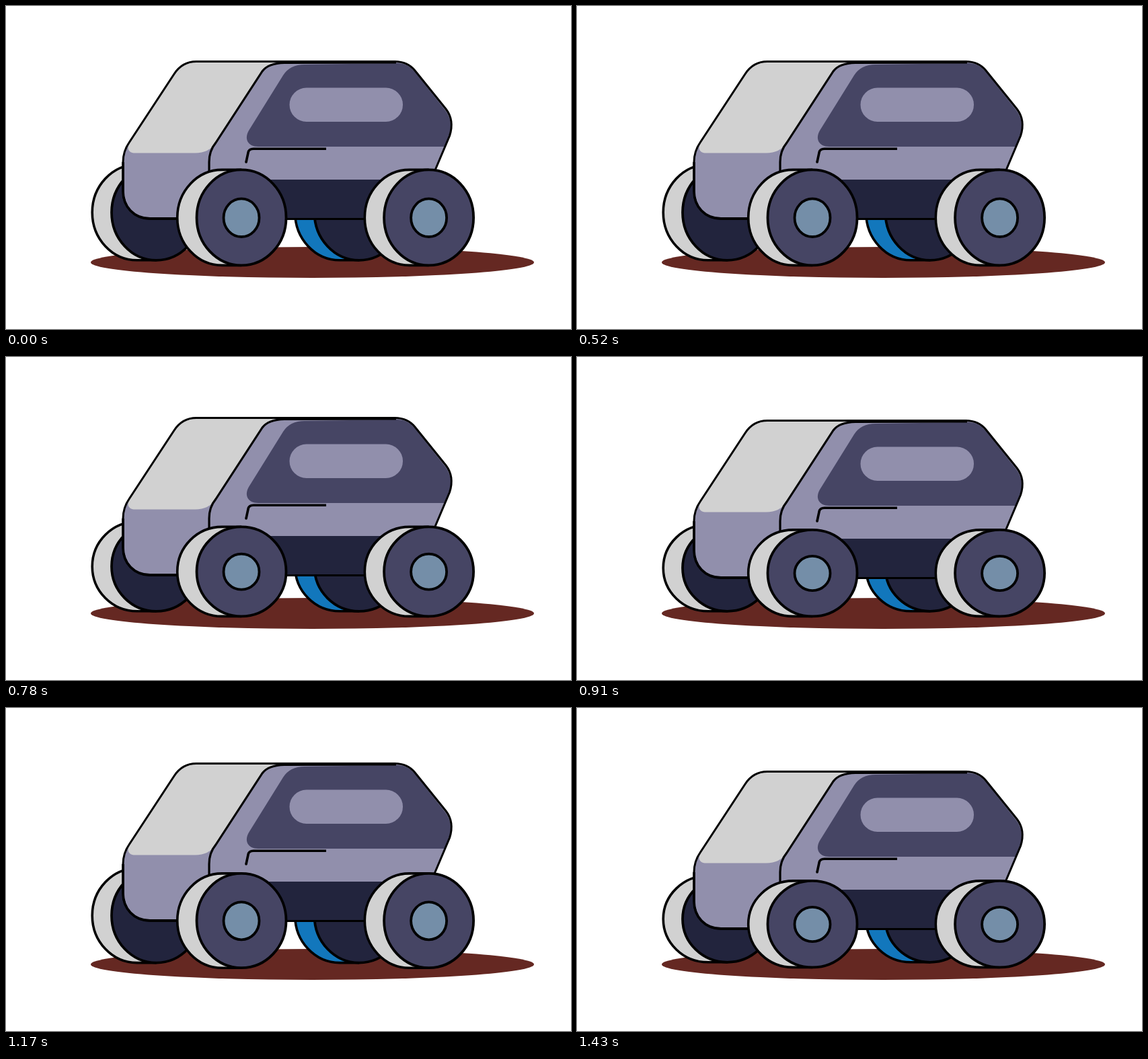
Recreate the animation shown at these times as an HTML page with a canvas. Size 840 px wide and 480 px high, loop 1560 ms.

```html
<!DOCTYPE html>
<html lang="en">
<head>
<meta charset="utf-8">
<title>Rover</title>
<style>
  html, body { margin: 0; width: 100%; height: 100%; overflow: hidden; background: #fff; }
  canvas { display: block; width: 840px; height: 480px; }
</style>
</head>
<body>
<canvas id="stage" width="840" height="480"></canvas>
<script>
const ctx = document.getElementById('stage').getContext('2d');

const STEP = 130, STEPS = 12;
const LILAC = '#918fac', SLATE = '#464564', NAVY = '#22243d', GREY = '#d1d1d1',
      BLUE = '#1277bc', HUB = '#748ea8', EARTH = '#652822';

// Each pose: body drop, wheel height, wheel shift
const POSES = {
  tall:  { drop: 0,  height: 142,   shift: 0 },
  shake: { drop: 0,  height: 140.3, shift: 0.8 },
  dip:   { drop: 8,  height: 133,   shift: 0 },
  low:   { drop: 12, height: 128.5, shift: 0 }
};

function poseAt(ms) {
  const i = Math.floor(ms / STEP) % STEPS;
  const sinking = i >= 6 && i % 4 >= 2;
  if (sinking) return i % 2 ? POSES.low : POSES.dip;
  return i % 2 ? POSES.shake : POSES.tall;
}

function paint(path, fill, width) {
  if (fill) {
    ctx.fillStyle = fill;
    ctx.fill(path);
  }
  if (width) {
    ctx.lineWidth = width;
    ctx.stroke(path);
  }
}

function oval(x, y, rx, ry) {
  const p = new Path2D();
  p.ellipse(x, y, rx, ry, 0, 0, Math.PI * 2);
  return p;
}

function wheel(x, bottom, pose, tread, face, hub) {
  const rx = 66.5, ry = pose.height / 2, y = bottom + pose.shift - ry, back = x - 28.8;
  const tyre = new Path2D();
  tyre.moveTo(x, y - ry);
  tyre.lineTo(back, y - ry);
  tyre.ellipse(back, y, rx, ry, 0, -Math.PI / 2, Math.PI / 2, true);
  tyre.lineTo(x, y + ry);
  paint(tyre, tread, 3.6);
  paint(oval(x, y, rx, ry), face, 3.8);
  if (hub) paint(oval(x, y + 0.3, 26.5, 26.5 * ry / rx), hub, 3.8);
}

const shell = new Path2D(`M283 82.5 H578 Q597 82.5 608 96 L654 153 Q667 170 659.5 193
  L632 258 L605 316.5 H214 C190 316 174 298 174 275 V232 Q174 216 183 203
  L250 101 Q262 82.5 283 82.5 Z`);
const windscreen = new Path2D(`M283 82.5 H412 Q390 84 381 97 L312 203
  Q302 218.5 281 218.5 H190 Q178 217 183 203 L250 101 Q262 82.5 283 82.5 Z`);
const skirt = new Path2D('M330 258 H632 L605 316.5 H330 Z');
const panel = new Path2D(`M444 87 L580 85 Q597 84 608 98 L653 155 Q665 171 659 193
  L652 209 H375 C359 209 354 197 361 185 L412 103 Q422 87 444 87 Z`);
const pillar = new Path2D('M580 84 L414 84.5 Q390 85 381 97 L312 203 Q302 215 302 232 V250');
const pill = new Path2D();
pill.roundRect(421.5, 121.5, 168.5, 50.5, 25.2);
const handle = new Path2D('M476 212.3 H368 Q361 212.3 360 218 L357 232');
const nub = oval(357, 232, 1.8, 1.8);

function body(drop) {
  ctx.save();
  ctx.translate(0, drop);
  paint(shell, LILAC);
  paint(windscreen, GREY);
  paint(skirt, NAVY);
  paint(panel, SLATE);
  paint(pill, LILAC);
  paint(pillar, null, 3.2);
  paint(shell, null, 3);
  paint(new Path2D('M174 232 V275 C174 298 190 315.8 214 315.8 H262'), null, 3.6);
  paint(handle, null, 3.6);
  paint(nub, '#000');
  ctx.restore();
}

function draw(ms) {
  const pose = poseAt(ms);
  ctx.fillStyle = '#fff';
  ctx.fillRect(0, 0, 840, 480);
  ctx.strokeStyle = '#000';
  ctx.lineJoin = 'round';
  paint(oval(455.5, 381, 329.5, 23), EARTH);
  wheel(223.5, 377.8, pose, GREY, NAVY);
  wheel(525, 377.8, pose, BLUE, NAVY);
  body(pose.drop);
  wheel(350, 385.4, pose, GREY, SLATE, HUB);
  wheel(628.6, 385.4, pose, GREY, SLATE, HUB);
}

const start = performance.now();
function tick() {
  draw((performance.now() - start) % (STEP * STEPS));
  requestAnimationFrame(tick);
}
tick();
</script>
</body>
</html>
```
